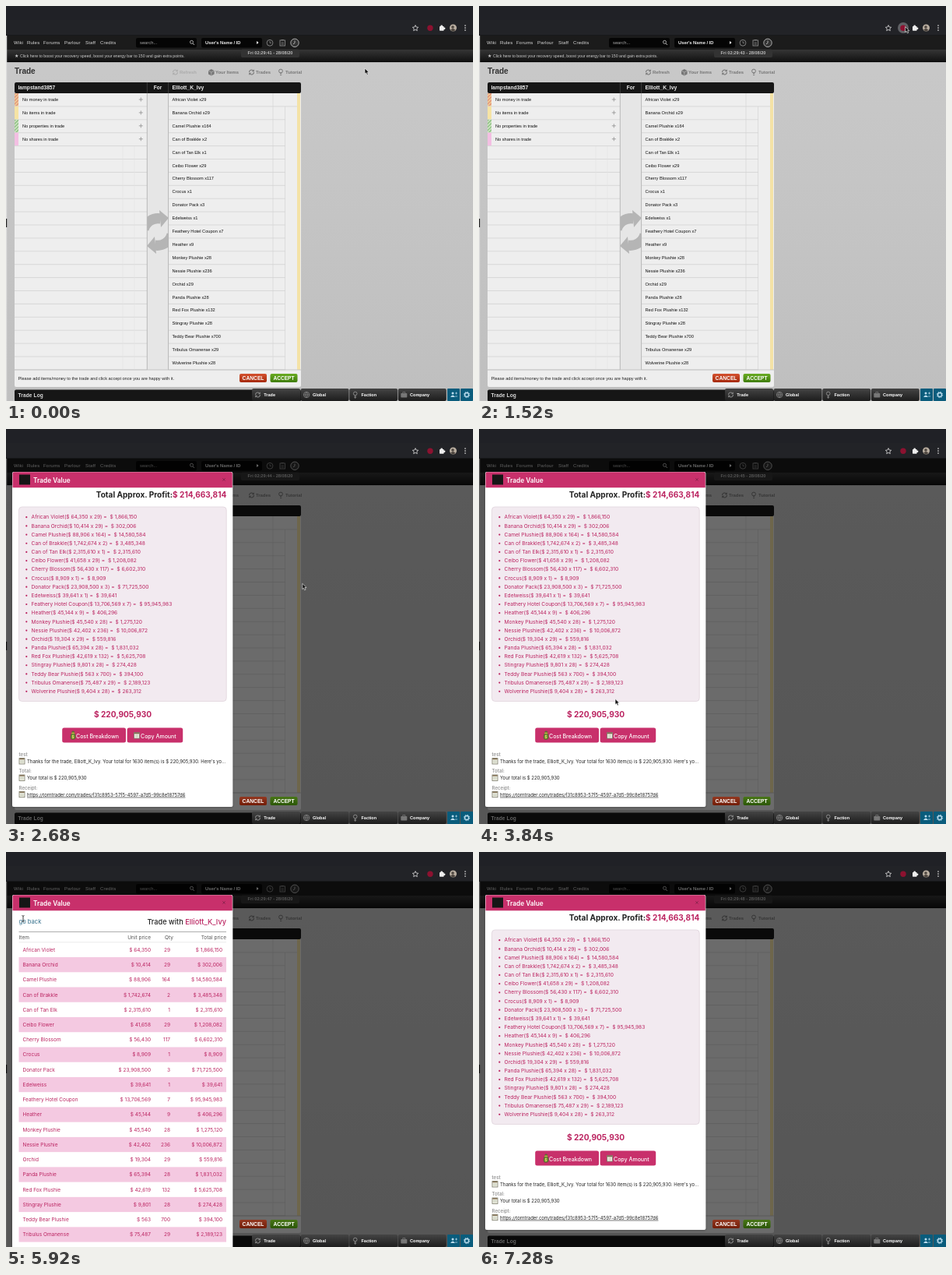
These frames come from a looping animation (600 px wide and 507 px high, 7320 ms). An HTML page:

```html
<!DOCTYPE html>
<html lang="en">
<head>
<meta charset="utf-8">
<title>Trade value</title>
<style>
html, body { margin: 0; width: 100%; height: 100%; overflow: hidden; background: #c4c4c4; }
svg { display: block; width: 100%; height: 100%; }
.site { font-family: "Liberation Sans", Arial, sans-serif; }
.modal { font-family: Inter, Roboto, sans-serif; }
text { white-space: pre; }
</style>
</head>
<body>
<svg id="stage" viewBox="0 0 600 507"></svg>
<script>
const LOOP = 7320;
const PARTNER = 'Elliott_K_Ivy';
const PINK = '#c8306b';
const DEEP_PINK = '#bb2360';
const GRAY = '#777';

const items = [
  ['African Violet', 64350, 29], ['Banana Orchid', 10414, 29], ['Camel Plushie', 88906, 164],
  ['Can of Brakkle', 1742674, 2], ['Can of Tan Elk', 2315610, 1], ['Ceibo Flower', 41658, 29],
  ['Cherry Blossom', 56430, 117], ['Crocus', 8909, 1], ['Donator Pack', 23908500, 3],
  ['Edelweiss', 39641, 1], ['Feathery Hotel Coupon', 13706569, 7], ['Heather', 45144, 9],
  ['Monkey Plushie', 45540, 28], ['Nessie Plushie', 42402, 236], ['Orchid', 19304, 29],
  ['Panda Plushie', 65394, 28], ['Red Fox Plushie', 42619, 132], ['Stingray Plushie', 9801, 28],
  ['Teddy Bear Plushie', 563, 700], ['Tribulus Omanense', 75487, 29], ['Wolverine Plushie', 9404, 28]
];

const money = n => '$ ' + n.toLocaleString('en-US');
const text = (x, y, s, size, fill, more = '') =>
  `<text x="${x}" y="${y}" font-size="${size}" fill="${fill}" ${more}>${s}</text>`;
const rect = (x, y, w, h, fill, more = '') =>
  `<rect x="${x}" y="${y}" width="${w}" height="${h}" fill="${fill}" ${more}/>`;
const path = (d, stroke, width = 1, fill = 'none', more = '') =>
  `<path d="${d}" stroke="${stroke}" stroke-width="${width}" fill="${fill}" ${more}/>`;
const circle = (x, y, r, fill, more = '') =>
  `<circle cx="${x}" cy="${y}" r="${r}" fill="${fill}" ${more}/>`;
const group = (id, body, more = '') => `<g id="${id}" ${more}>${body}</g>`;
const at = (x, y, body) => `<g transform="translate(${x} ${y})">${body}</g>`;
const bold = 'font-weight="700"';
const semi = 'font-weight="600"';
const medium = 'font-weight="500"';
const end = 'text-anchor="end"';
const middle = 'text-anchor="middle"';

const defs = `<defs>
  <linearGradient id="page" x2="0" y2="1"><stop stop-color="#c9c9c9"/><stop offset="1" stop-color="#bfbfbf"/></linearGradient>
  <linearGradient id="bar" x2="0" y2="1"><stop stop-color="#353535"/><stop offset="1" stop-color="#101010"/></linearGradient>
  <linearGradient id="tab" x2="0" y2="1"><stop stop-color="#444"/><stop offset="1" stop-color="#1d1d1d"/></linearGradient>
  <linearGradient id="red" x2="0" y2="1"><stop stop-color="#d4512f"/><stop offset="1" stop-color="#a52a0c"/></linearGradient>
  <linearGradient id="green" x2="0" y2="1"><stop stop-color="#69ab22"/><stop offset="1" stop-color="#3f7d0c"/></linearGradient>
  <pattern id="redStripe" width="3" height="3" patternUnits="userSpaceOnUse" patternTransform="rotate(45)"><rect width="3" height="3" fill="#f3d99a"/><rect width="1.5" height="3" fill="#e08a78"/></pattern>
  <pattern id="greenStripe" width="3" height="3" patternUnits="userSpaceOnUse" patternTransform="rotate(45)"><rect width="3" height="3" fill="#dcebcf"/><rect width="1.5" height="3" fill="#85bd7c"/></pattern>
  <clipPath id="midClip"><rect x="181.5" y="112" width="27" height="355"/></clipPath>
  <filter id="shadow" x="-10%" y="-10%" width="120%" height="120%"><feDropShadow dx="0" dy="1" stdDeviation="1.5" flood-opacity=".25"/></filter>
</defs>`;

function browser() {
  const star = 'M526 24.6l1.1 2.4 2.6.3-1.9 1.8.5 2.6-2.3-1.3-2.3 1.3.5-2.6-1.9-1.8 2.6-.3z';
  return rect(0, 0, 600, 18, '#202126') + rect(0, 18, 600, 20, '#222327')
    + rect(0, 37, 600, 1, '#17181a') + path(star, '#ddd', .8)
    + circle(545, 28, 7, '#606165', 'id="iconHover"') + circle(545, 28.2, 3.7, '#8c1230')
    + rect(557, 26, 5.6, 5.8, '#eee', 'rx=".7"') + circle(559.7, 25.8, 1.4, '#eee') + circle(563, 28.8, 1.4, '#eee')
    + circle(574.5, 28, 4.5, '#b9aea0') + circle(574, 27, 1.8, '#4c443e') + path('M571 31q3-4 6.5 0l-3 1.5z', 'none', 0, '#4c443e')
    + [25, 28, 31].map(y => circle(590, y, .85, '#ddd')).join('');
}

function siteHeader() {
  const nav = [[10, 'Wiki'], [27, 'Rules'], [48, 'Forums'], [75, 'Parlour'], [102, 'Staff'], [121, 'Credits']];
  return rect(0, 38, 600, 18, '#1b1b1b') + rect(0, 56, 600, 16, 'url(#bar)') + rect(0, 71.3, 600, .8, '#000')
    + nav.map(([x, s]) => text(x, 49, s, 6, '#ddd', 'letter-spacing=".2"')).join('')
    + rect(167, 41, 78, 12.5, '#050505', 'rx="2"') + text(172, 49, 'search...', 5.8, '#aaa')
    + circle(238.5, 46.3, 2, 'none', 'stroke="#aaa"') + path('M240 48l2 2', '#aaa')
    + rect(251, 41, 78, 12.5, '#050505', 'rx="2"') + text(256, 49.2, "User's Name / ID", 5.8, '#eee', bold)
    + path('M322 45l2.6 2-2.6 2z', 'none', 0, '#eee')
    + circle(339, 47.3, 3.9, 'none', 'stroke="#888" stroke-width=".9"') + path('M339 45v2.4h2', '#888', .8)
    + rect(352, 44, 6.5, 7, 'none', 'stroke="#888" stroke-width=".9"') + path('M353.5 43.5h3.5M353.5 47h3.5M353.5 49h3.5', '#888', .8)
    + circle(371, 47.3, 5.2, '#333', 'stroke="#bbb" stroke-width=".9"') + path('M371 44.5v3l-2.3 1.5', '#ccc', .8)
    + text(11, 66.4, '★', 6, '#ccc')
    + text(18, 66.3, 'Click here to boost your recovery speed, boost your energy bar to 150 and gain extra points.', 5.2, '#ccc')
    + rect(302, 55.5, 75, 10.5, '#333', 'rx="2"')
    + text(339.5, 62.4, '', 5.6, '#bbb', `id="clock" ${bold} ${middle}`);
}

function cycleIcon(x, y, color = GRAY) {
  return at(x, y, path('M-3 0a3 3 0 0 1 5-2.2M3 0a3 3 0 0 1-5 2.2', color, 1.1)
    + path('M3.3-3.8v3h-3zM-3.3 3.8v-3h3z', 'none', 0, color));
}

function toolbar() {
  const label = (x, s) => text(x, 87, s, 5.9, '#777', bold);
  return text(11, 87.4, 'Trade', 10, '#333', bold)
    + group('refresh', cycleIcon(217.5, 85) + label(223, 'Refresh'))
    + path('M260 83l3.8-2 3.8 2v4.5l-3.8 2-3.8-2z', 'none', 0, GRAY) + path('M260 83l3.8 2 3.8-2M263.8 85v4', '#c4c4c4', .6)
    + label(269, 'Your Items') + cycleIcon(315.5, 85) + label(321, 'Trades')
    + circle(353, 83.5, 2.4, 'none', `stroke="${GRAY}"`) + path('M352 86.5h2.2M352 88.5h2.2', GRAY, .9) + label(359, 'Tutorial');
}

function tradePanel() {
  const pitch = 16.9, top = 112;
  const kinds = [['money', 'url(#redStripe)'], ['items', '#f5e3a4'], ['properties', 'url(#greenStripe)'], ['shares', '#f3bfe2']];
  const rows = items.map(([name, , qty], i) => {
    const y = top + i * pitch;
    return text(213.5, y + 10, `${name} x${qty}`, 5.65, '#111')
      + path(`M11 ${y + pitch}h170M209 ${y + pitch}h${i ? 150 : 165}`, '#cecece', .7);
  }).join('');
  const left = kinds.map(([kind, fill], i) => {
    const y = top + i * pitch;
    return rect(11, y, 5, pitch - .5, fill) + text(21, y + 10, `No ${kind} in trade`, 5.65, '#111')
      + path(`M170.8 ${y + 8}h5M173.3 ${y + 5.5}v5`, '#999', .9);
  }).join('');
  const arrow = path('M177 287A19 19 0 0 1 199 273', '#b5b5b5', 13)
    + path('M197 262l12 10-10 12z', 'none', 0, '#b5b5b5');
  return rect(11, 98, 368, 391, '#eee', 'rx="2"')
    + rect(11, 98, 368, 14, '#161616', 'rx="2"') + path('M181.3 98v14M208.6 98v14', '#444', .8)
    + text(15.5, 107.3, 'lampstand3857', 6.6, '#eee', bold)
    + text(195, 107.3, 'For', 6.4, '#eee', `${bold} ${middle}`)
    + text(213.5, 107.3, PARTNER, 6.8, '#eee', bold)
    + rect(181.5, 112, 27, 355, '#e6e6e6')
    + `<g clip-path="url(#midClip)">${arrow}<g transform="rotate(180 195 290)">${arrow}</g></g>`
    + rows + left
    + path('M181.3 112v355M208.6 112v355', '#aaa', .8)
    + path('M150 180v287M165 180v287', '#e2e2e2', .6)
    + path('M343 112v355M358.5 128.9v338', '#d4d4d4', .7)
    + rect(374, 112, 4, 355, '#f4e2a6') + path('M11 467h368', '#bbb', .8)
    + text(15.5, 479.6, 'Please add items/money to the trade and click accept once you are happy with it.', 5.6, '#222')
    + rect(11, 492.5, 368, 15, '#161616', 'rx="2"') + text(15.5, 502, 'Trade Log', 6.5, '#ddd', bold + ' letter-spacing=".15"');
}

function actions() {
  const face = (x, fill) => rect(x, 472, 35, 11, fill, 'rx="2"');
  return face(300, 'url(#red)') + face(339.5, 'url(#green)')
    + group('faceDim', face(300, '#000') + face(339.5, '#000'))
    + text(317.5, 480, 'CANCEL', 6.7, '#fff', `${bold} ${middle}`)
    + text(357, 480, 'ACCEPT', 6.6, '#fff', `${bold} ${middle}`);
}

function chatBar() {
  const icons = [
    cycleIcon(0, 0, '#888'),
    circle(0, 0, 3.7, 'none', 'stroke="#888" stroke-width=".8"') + path('M-3.7 0h7.4M0-3.7v7.4M0-3.7q-3.5 3.7 0 7.4M0-3.7q3.5 3.7 0 7.4', '#888', .6),
    circle(0, -1.5, 2.3, 'none', 'stroke="#888"') + path('M0 .8v4M-1.5 3h3', '#888'),
    rect(-4, -2, 8, 5.5, '#777', 'rx=".7"') + path('M-1.5-2v-1.5h3V-2', '#777', .8)
  ];
  return ['Trade', 'Global', 'Faction', 'Company'].map((s, i) => {
    const x = 316 + i * 62.6;
    return rect(x, 491, 62, 16, 'url(#tab)', 'rx="2"') + at(x + 7.5, 499, icons[i]) + text(x + 15.3, 501.2, s, 5.5, '#fff', bold);
  }).join('')
    + rect(567, 491, 16, 16, '#0a5c7c', 'rx="1"') + rect(584, 491, 16, 16, '#0a5c7c', 'rx="1"')
    + circle(574, 497, 1.5, '#bde') + path('M571 502q3-5 6 0z', 'none', 0, '#bde') + path('M577 497h3M578.5 495.5v3M577 501h3', '#bde', .7)
    + circle(592, 499, 2.5, 'none', 'stroke="#bde" stroke-width="1.3"') + circle(592, 499, 3.7, 'none', 'stroke="#bde" stroke-width="1" stroke-dasharray="1.4 1.5"');
}

function modalFrame(height) {
  return rect(8, 55, 283.3, height, '#fff', 'rx="2" filter="url(#shadow)"')
    + path('M8.5 75.3V57.3q0-2 2-2H288.8q2 0 2 2v18z', 'none', 0, PINK)
    + rect(17, 58.5, 14, 13, '#161616')
    + text(35, 68.6, 'Trade Value', 8.3, '#fff', semi)
    + path('M278.3 63.2l3.4 3.4M281.7 63.2l-3.4 3.4', '#8d2450', 1);
}

const note = (x, y) => rect(x, y, 7, 7.4, '#f4f3e8', 'stroke="#777766" stroke-width=".8"')
  + path(`M${x + .4} ${y + .9}h6.2`, '#7d6a4c', 1.5) + path(`M${x + 1.3} ${y + 3.3}h4.4M${x + 1.3} ${y + 5.2}h4.4`, '#9aa88f', .6);

function buttons(y) {
  const face = (x, w) => rect(x, y - .3, w, 19.2, PINK, 'rx="2.5"');
  return face(72.2, 81.8) + face(155.6, 71.6)
    + path(`M84.6 ${y + 6.5}l.6-2.2h2l.6 2.2q3 6.5-.2 8h-3.4q-2.5-2.2.4-8z`, '#37521f', .5, '#6d8c35')
    + path(`M84 ${y + 6.6}h4.4`, '#e3c04d', .9) + text(86, y + 13, '$', 4.5, '#f2dc6a', `${bold} ${middle}`)
    + note(164.5, y + 6)
    + text(90, y + 13, 'Cost Breakdown', 7, '#fff', medium) + text(173, y + 13, 'Copy Amount', 7, '#fff', medium);
}

const field = (y, label, value, more = '') => text(16.5, y, label, 6.1, '#999', semi)
  + note(17, y + 2.6) + text(27, y + 9, value, 5.98, '#222', more);

function emptyModal() {
  return modalFrame(124.5) + path('M17 84h266', '#aaa', .8) + buttons(107)
    + field(143.8, 'Total:', 'Your total is') + field(165, 'Receipt:', '');
}

function summaryModal() {
  const list = items.map(([name, price, qty], i) => {
    const y = 113 + i * 11.18;
    return circle(26.3, y + .2, 1.1, DEEP_PINK)
      + text(32.6, y + 2.4, `${name}(${money(price)} x ${qty}) =&#160; ${money(price * qty)}`, 6.64, DEEP_PINK);
  }).join('');
  const sum = money(items.reduce((total, [, price, qty]) => total + price * qty, 0));
  return modalFrame(430)
    + text(283.3, 88.4, `Total Approx. Profit:<tspan fill="${DEEP_PINK}">$ 214,663,814</tspan>`, 10.05, '#222', `${bold} ${end}`)
    + rect(16.5, 100, 266.7, 249.5, '#f2eaf0', 'rx="4" stroke="#ddd0d9" stroke-width=".7"') + list
    + text(150, 369.6, sum, 10.15, DEEP_PINK, `${bold} ${middle}`) + buttons(383.7)
    + field(420, 'test', `Thanks for the trade, ${PARTNER}. Your total for 1630 item(s) is ${sum}. Here's yo…`)
    + field(441.4, 'Total:', `Your total is ${sum}`)
    + field(462.7, 'Receipt:', 'https://torntrader.com/trades/f31c8953-57f5-4597-a7d5-99c8e18757d6', 'text-decoration="underline"');
}

function tableModal() {
  const pitch = 19.24;
  const head = (x, s, more) => text(x, 111.8, s, 6.5, '#555', more);
  const rows = items.map(([name, price, qty], i) => {
    const y = 125.4 + i * pitch;
    return (i % 2 ? rect(16.5, y - pitch / 2, 266.5, pitch, '#f4c9e1') : '')
      + text(21.5, y + 2.4, name, 6.5, DEEP_PINK)
      + [[186, money(price)], [211, qty], [278, money(price * qty)]]
        .map(([x, s]) => text(x, y + 2.4, s, 6.5, DEEP_PINK, end)).join('');
  }).join('');
  return modalFrame(470)
    + text(16.5, 92.2, 'go back', 7.6, '#35708c')
    + text(283, 93, `Trade with <tspan fill="${DEEP_PINK}">${PARTNER}</tspan>`, 9.2, '#222', `${medium} ${end}`)
    + path('M16.5 102.5h266.5', '#999', .8)
    + head(16.5, 'Item') + head(186, 'Unit price', end) + head(215, 'Qty', end) + head(283, 'Total price', end)
    + path('M16.5 115.8h266.5', '#ddd', .6) + rows;
}

function cursors() {
  return group('arrow', path('M0 0v7.2l1.7-1.5 1.2 2.7 1.4-.6-1.2-2.6h2.3z', '#fff', .6, '#111'))
    + group('hand', path('M-1 .8q0-1 .9-1t.9 1v2.4l3 .6q1.3.3 1.2 1.6l-.5 3H-.5L-3 5q-.5-1.2.8-.9l1.2.9z', '#111', .7, '#fff'))
    + group('beam', path('M-1.5-.5L0 .3l1.5-.8M0 .3v6.4M-1.5 7.5L0 6.7l1.5.8', '#111', .8));
}

const $ = id => document.getElementById(id);
const stage = $('stage');
stage.innerHTML = defs + group('site',
  rect(0, 38, 600, 469, 'url(#page)') + siteHeader() + toolbar() + tradePanel()
  + rect(0, 38, 1.2, 469, '#ddd') + rect(0, 273, 1.2, 11, '#222'), 'class="site"')
  + rect(0, 38, 600, 469, '#000', 'id="dim"')
  + group('actions', actions(), 'class="site"') + group('chat', chatBar(), 'class="site"')
  + group('browser', browser())
  + group('empty', emptyModal(), 'class="modal"')
  + group('summary', summaryModal(), 'class="modal"')
  + group('table', tableModal(), 'class="modal"')
  + group('cursor', cursors());

// Pointer stops: time, x, y
const stops = [
  [0, 461, 80], [500, 466, 79], [1180, 546, 27], [1480, 547.5, 26.5], [1780, 547, 27],
  [2080, 529.5, 65], [2500, 420, 170], [3100, 240, 300], [3840, 175, 346.5], [4160, 108.5, 392],
  [5360, 108.5, 392], [5860, 22, 82], [6420, 22, 82], [6800, -8, 90], [LOOP, -8, 90]
];
const OPEN = 1760, LOADED = 2640, BREAKDOWN = 4320, BACK = 6320;

const clamp = v => Math.max(0, Math.min(1, v));
const ease = k => k * k * (3 - 2 * k);

function pointer(t) {
  const i = stops.findIndex(s => s[0] > t);
  const [t0, x0, y0] = stops[i - 1], [t1, x1, y1] = stops[i];
  const k = ease((t - t0) / (t1 - t0));
  return [x0 + (x1 - x0) * k, y0 + (y1 - y0) * k];
}

const show = (id, on) => $(id).setAttribute('display', on ? 'inline' : 'none');

function draw(t) {
  const dim = clamp((t - OPEN) / 120);
  $('dim').setAttribute('opacity', .55 * dim);
  $('faceDim').setAttribute('opacity', .3 * dim);
  $('refresh').setAttribute('opacity', .35 + .65 * clamp((t - 100) / 400));
  $('clock').textContent = `Fri 02:29:${Math.floor(41.62 + t / 1000)} - 28/08/20`;

  const breakdown = t >= BREAKDOWN && t < BACK;
  show('empty', t >= OPEN && t < LOADED);
  show('summary', t >= LOADED && !breakdown);
  show('table', breakdown);

  const [x, y] = pointer(t);
  const onButton = t >= LOADED && x > 72 && x < 154 && y > 384 && y < 402;
  const onLink = breakdown && x < 45 && y < 96;
  show('hand', onButton);
  show('beam', onLink);
  show('arrow', !onButton && !onLink);
  show('iconHover', Math.hypot(x - 545, y - 28) < 7);
  $('cursor').setAttribute('transform', `translate(${x.toFixed(2)} ${y.toFixed(2)})`);
}

const start = performance.now();
function tick() {
  draw((performance.now() - start) % LOOP);
  requestAnimationFrame(tick);
}
tick();
</script>
</body>
</html>
```
